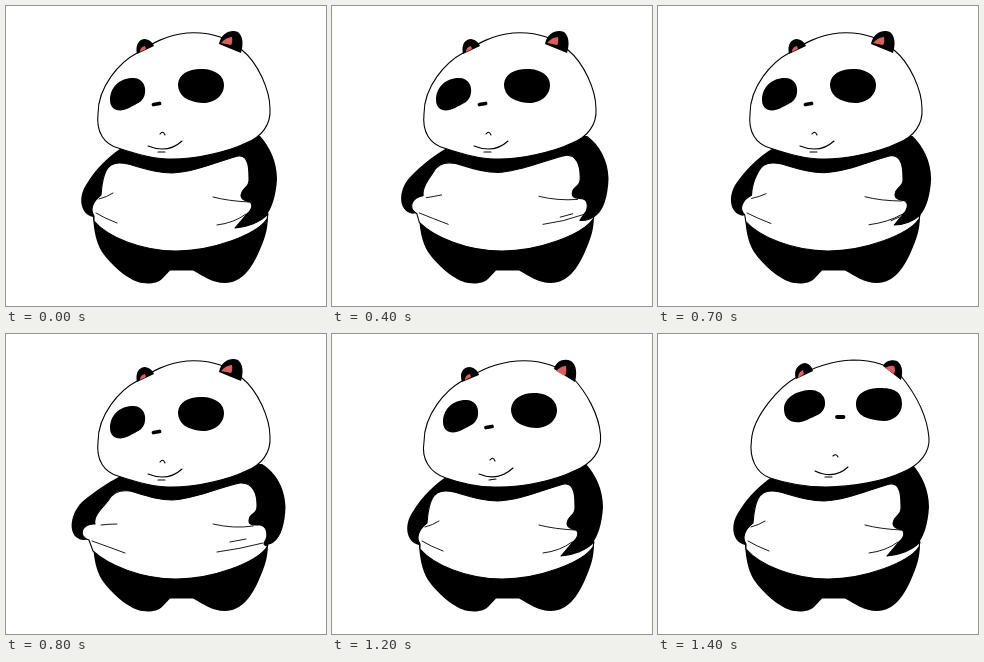
Recreate the animation shown at these times as an HTML page. Size 320 by 300 pixels, loop 2000 ms.

```html
<!DOCTYPE html>
<html lang="en">
<head>
<meta charset="utf-8">
<title>Panda belly</title>
<style>
html, body { margin: 0; width: 100%; height: 100%; overflow: hidden; background: #fff; }
svg { display: block; width: 320px; height: 300px; }
path { stroke-linecap: round; stroke-linejoin: round; }
.black { fill: #000; }
.white { fill: #fff; stroke: #000; stroke-width: 1.1; }
.line { fill: none; stroke: #000; stroke-width: 1.1; }
.pink { fill: #d9605f; }
#folds { stroke-width: .9; }
#nose { stroke-width: 3.8; }
</style>
</head>
<body>
<svg viewBox="0 0 320 300">
  <path class="black" d="M114 146 L100 190 L87 211 C88 225 90 236 96 246 C106 260 120 272 132 276 C140 278.500 151 278 156 273 L164 264.500 L187 264.500 C197 270 206 277 219 277 C236 277 246 261 252 248 C258 235 262 224 262 210 L260 150 L240 132Z"/>
  <path class="black" id="armL"/>
  <path class="black" id="armR"/>
  <path class="white" id="belly"/>
  <path class="line" id="folds"/>
  <path class="white" id="head"/>
  <path class="black" id="ears"/>
  <path class="pink" id="inner"/>
  <path class="black" id="eyes"/>
  <path class="line" id="nose"/>
  <path class="line" id="mouth"/>
</svg>
<script>
// Body shapes: relaxed, pulled wide
const body = {
  armL: [
    'M122 138 C104 148 90 162 80 179 C72 191 74 208 87 211 L97 207 L125 165Z',
    'M122 138 C106 146 90 156 76 168 C63 181 61 204 77 206 L92 205 L125 165Z'],
  armR: [
    'M240 130 L254 130 C264 141 271 156 271 173 C270 190 266 202 260 210 C252 218 245 222 232 222 L240 150Z',
    'M240 130 L256 130 C269 138 279 153 279.500 173 C279 190 275 203 268 208 C262 213 255 210 250 206 L240 150Z'],
  belly: [
    'M100 165 C104 156 114 156 122 158 C140 163 152 167 166 167 C189 166 210 156 232 150 C243 148 243 164 243 172 C244 182 236 181 235 189 C235 194 240 195 244 196 C248 199 245 205 240 209 L229 222 C241 221 255 216 262 208 L261 213 C250 229 206 245 170 245 C135 245 102 231 88 215 L88 210 C84 204 86 196 95 189 C96 180 96 173 100 165Z',
    'M102 167 C107 157 116 156 124 157 C141 162 152 166 166 166 C189 165 214 153 234 149 C247 148 251 160 251 170 C252 182 243 178 243 187 C243 192 250 191 254 191 C262 192 262 203 259 207 L258 210 C259 212 261 212 262 211 L261 213 C250 229 206 245 170 245 C135 245 102 231 87 217 L83 206 C71 202 76 189 89 190 C87 182 97 173 102 167Z'],
  folds: [
    'M93 193 Q101 191 107 187 M90 207 Q98 212 111 217 M207 191 Q222 195 243 196 M211 219 Q228 217 240 208 M236 217 L242 213',
    'M95 191 Q103 190 111 190 M86 207 Q103 213 119 219 M207 190 Q228 195 247 192 M211 218 Q234 215 257 209 M224 208 L240 205']
};

// Head shapes: facing left, turning, facing right
const face = {
  head: [
    'M131 47 C114 56 92 80 92 108 C90 126 98 138 112 142 C127 147 146 153 162 153 C186 154 222 146 240 137 C256 131 265 118 264 103 C264 84 252 57 236 44 C218 28 196 26 181 27 C160 29 145 38 131 47Z',
    'M130 47 C114 56 92 80 92 108 C89 125 98 139 114 144 C128 149 146 153 162 153 C190 154 224 146 242 137 C260 130 270 117 268.500 101 C267 80 254 58 241 44 C222 28 200 26 185 27 C160 29 145 39 130 47Z',
    'M139 43 C122 52 95 82 93.500 106 C91 124 98 139 112 144 C130 150 148 153 168 153 C195 153 226 147 245 138 C262 131 272 118 271 104 C269 80 256 58 243 42 C228 28 206 26 195 26 C172 27 154 34 139 43Z'],
  ears: [
    'M131 48 C129 39 133 33 139 33 C144 34 147 37 148 40Z M213 38 C215 27 225 23 232 26 C238 31 237 40 235 47Z',
    'M130 48 C127 39 131 33 138 33 C143 34 146 37 147 41Z M222 35 C224 27 232 24 239 27 C245 31 245 40 243 48Z',
    'M138 45 C135 36 140 30 147 29 C152 30 154 33 155 37Z M225 32 C227 27 234 25 239 27 C245 31 245 39 243 46Z'],
  inner: [
    'M134 46 Q134 41 139 40 L140 43Z M215 37 Q220 31 226 31 Q227 36 225 39Z',
    'M133 46 Q133 41 138 40 L139 43Z M224 37 Q229 32 234 32 Q235 38 233 42Z',
    'M140 44 Q140 38 145 36 L146 40Z M227 34 Q232 31 236 32 Q238 36 236 40Z'],
  eyes: [
    'M104 94 C104 82 113 72 127 72 C136 72 140 79 139 87 C138 96 130 98 123 102 C113 107 104 104 104 94Z M172 78 C173 67 184 62 198 63 C210 64 218 70 218 79 C218 90 208 97 197 97 C182 96 172 90 172 78Z',
    'M111 88 C111 76 120 66 134 66 C143 66 147 73 146 81 C145 90 137 92 130 96 C120 101 111 98 111 88Z M179 75 C180 64 191 58 205 59 C217 60 225 67 225 76 C225 87 215 94 204 94 C189 93 179 87 179 75Z',
    'M126 75 C126 64 138 56 154 56 C163 57 168 63 167 71 C166 80 157 82 149 86 C138 91 126 88 126 75Z M198 70 C198 59 209 54 222 54 C235 54 244 57 244 70 C244 81 234 87 226 87 C210 86 198 82 198 70Z'],
  nose: [
    'M147.500 98.500 L153.500 97.500',
    'M154 93.500 L160 92.500',
    'M179 83 L185.500 83'],
  mouth: [
    'M154 128 Q157 124 159 129 M142 140 Q162 148 176 135 M152 146 L159 146',
    'M158 126 Q161 122 163 127 M147 140 Q166 148 181 134 M157 146 L164 145',
    'M175 122 Q178 119 180 123 M157 137 Q176 146 190 133 M167 143 L174 143']
};

const STEP = 100, LOOP = 2000;
const pulls = [0, .25, 1, 1.25, .65, .3];
const turns = [1, 1.5, 2];
const $ = id => document.getElementById(id);

function mix(a, b, t) {
  const ends = b.match(/-?[\d.]+/g);
  let i = 0;
  return a.replace(/-?[\d.]+/g, n => +(+n + (ends[i++] - n) * t).toFixed(2));
}

function blend(poses, t) {
  const i = Math.min(Math.floor(t), poses.length - 2);
  return mix(poses[i], poses[i + 1], t - i);
}

function drawPaths(set, t) {
  for (const id in set) $(id).setAttribute('d', blend(set[id], t));
}

function draw(step) {
  // Two squeezes of the belly, then the head turns and rests
  const squeezing = step < 12;
  drawPaths(body, squeezing ? pulls[step % 6] : 0);
  drawPaths(face, squeezing ? 0 : turns[Math.min(step - 12, 2)]);
}

let last = -1;
function tick() {
  const step = Math.floor(performance.now() % LOOP / STEP);
  if (step !== last) draw(last = step);
  requestAnimationFrame(tick);
}
tick();
</script>
</body>
</html>
```
